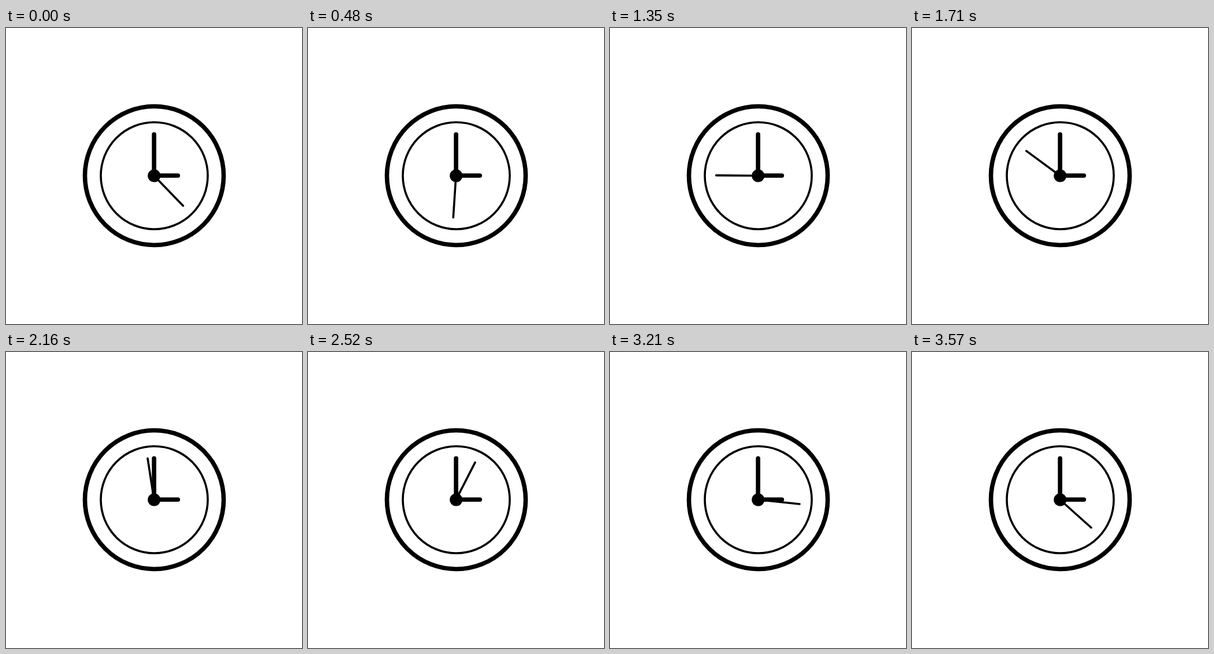
An HTML page that plays this animation: 512 px wide and 512 px high, repeating every 3600 ms.

```html
<!DOCTYPE html>
<html lang="en">
<head>
<meta charset="utf-8">
<title>Clock</title>
<style>
  html, body { margin: 0; width: 100%; height: 100%; overflow: hidden; background: #fff; }
  svg { display: block; width: 100%; height: 100%; }
  .line { fill: none; stroke: #000; stroke-linecap: round; }
  .bold { stroke-width: 7.6; }
  .thin { stroke-width: 3.6; }
</style>
</head>
<body>
<svg viewBox="0 0 512 512">
  <circle class="line bold" cx="256.5" cy="255.5" r="120"/>
  <circle class="line thin" cx="256.5" cy="255.5" r="92.5"/>
  <path class="line bold" d="M256.1 184V255.2H297.3"/>
  <path class="line thin" id="second" d="M256 255.5v-72.3"/>
  <circle cx="256.2" cy="255.6" r="11"/>
</svg>
<script>
  const LOOP = 3600, STEP = 30;
  const START = 135.9, SPEED = 0.0997; // degrees, degrees per ms
  const second = document.getElementById('second');
  const origin = performance.now();

  function draw(now) {
    const t = Math.max(0, now - origin) % LOOP;
    const angle = START + Math.floor(t / STEP) * STEP * SPEED;
    second.setAttribute('transform', `rotate(${angle} 256 255.5)`);
    requestAnimationFrame(draw);
  }
  draw(origin);
</script>
</body>
</html>
```
